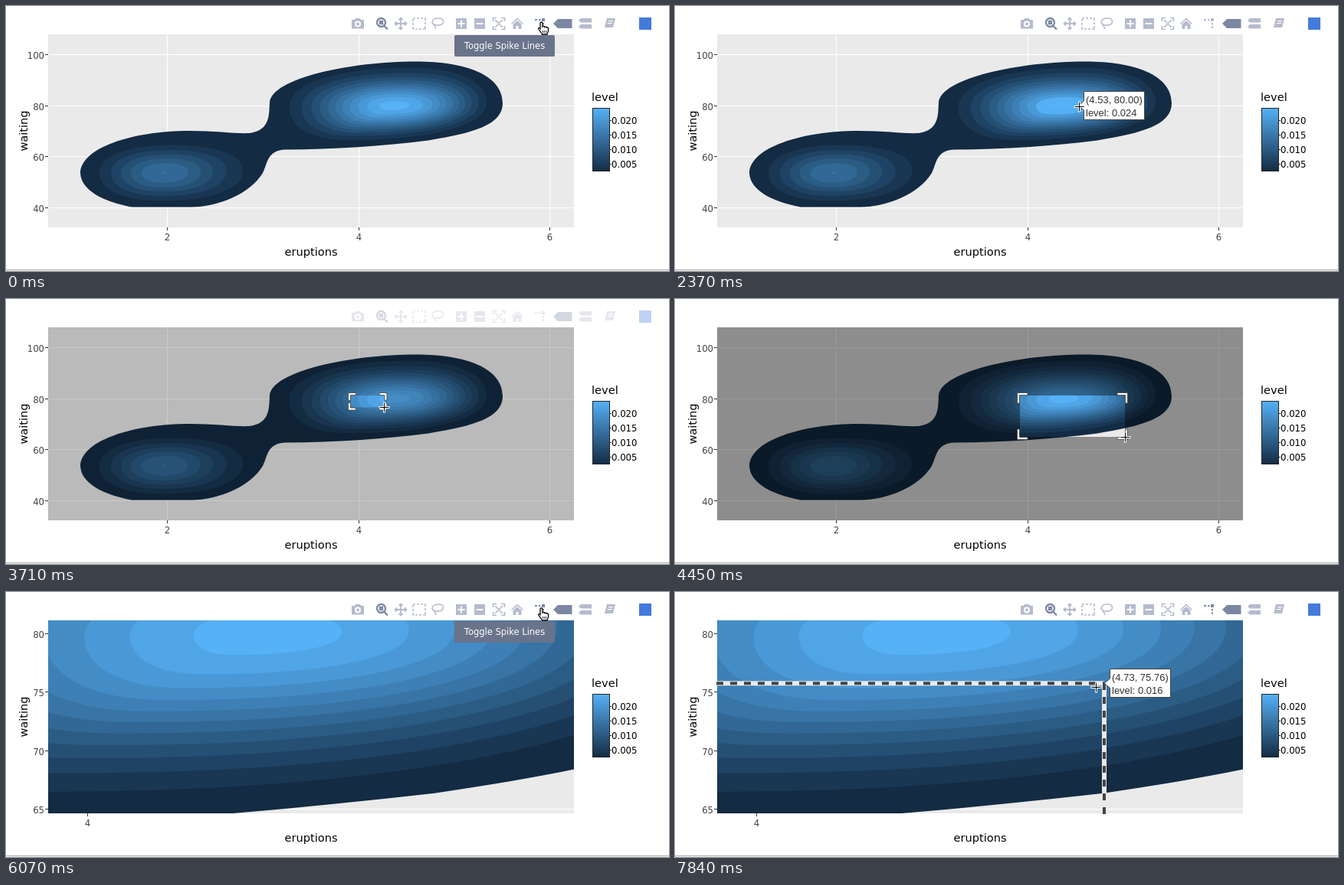
Recreate the animation shown at these times as an HTML page with a canvas. Size 865 px wide and 346 px high, loop 7.99 s.

```html
<!DOCTYPE html>
<html lang="en">
<head>
<meta charset="utf-8">
<title>Density contours</title>
<style>
  html, body { margin: 0; width: 100%; height: 100%; overflow: hidden; background: #fff; }
  canvas { display: block; }
</style>
</head>
<body>
<canvas id="stage" width="865" height="346"></canvas>
<script>
const ctx = document.getElementById('stage').getContext('2d');
const LOOP = 7990, STEP = 148.1, LAST_STEP = 53;
const PLOT = [55, 37, 686, 252];
const SANS = '"DejaVu Sans", sans-serif', LABEL = '"Liberation Sans", sans-serif';
const LIGHT = '#b5bbcd', DARK = '#7c87a2';
const ZOOM_STEP = 31, SPIKES_STEP = 45;
const BOX = { x: 450, y: 126 };

// Key points of the pointer: [step, x, y]
const CURSOR = [[0, 700, 29], [2, 672, 113], [4, 672, 113], [5, 652, 122], [12, 553, 134], [16, 527, 131],
  [20, 505, 128], [23, 450, 126], [24, 470, 132], [29, 587, 180], [34, 587, 180], [35, 499, 111],
  [41, 700, 29], [44, 700, 29], [47, 587, 82], [53, 549, 124]];
// Hovered spots: [step, x, y, level]
const HOVERS = [
  [[5, 649, 121, .002], [12, 554, 133, .02], [16, 526.4, 130, .024], [19, 515, 137, .024]],
  [[35, 501.5, 118.69, .018], [39, 638, 58, .014]],
  [[46, 625, 70, .014], [47, 594.2, 72.9, .018], [53, 560, 119.14, .016]]
];

const ramp = (k, from, to) => Math.max(0, Math.min(1, (k - from) / (to - from)));
const crisp = v => Math.floor(v) + .5;

function sample(track, k) {
  const i = track.findIndex(key => key[0] >= k);
  const b = track[i], a = track[i - 1] || b, f = ramp(k, a[0], b[0]) || 0;
  return a.slice(1).map((v, n) => v + (b[n + 1] - v) * f);
}

function levelColor(level) {
  const f = (level - 1) / 11, mix = (a, b) => Math.round(a + (b - a) * f);
  return `rgb(${mix(19, 86)},${mix(43, 177)},${mix(67, 247)})`;
}

// Superellipse whose extreme points lean away from a common centre
function oval([lx, ly], [tx, ty], [rx, ry], [bx, by]) {
  const path = new Path2D(), power = v => Math.sign(v) * Math.abs(v) ** (2 / 2.2);
  for (let i = 0; i < 120; i++) {
    const u = power(Math.cos(i * Math.PI / 60)), v = power(Math.sin(i * Math.PI / 60));
    const cx = v > 0 ? bx : tx, cy = u > 0 ? ry : ly;
    path.lineTo(cx + u * (u > 0 ? rx - cx : cx - lx), cy + v * (v > 0 ? by - cy : cy - ty));
  }
  path.closePath();
  return path;
}

// The lowest level joins both peaks; the others follow a Gaussian falloff
const contours = [[1, new Path2D(`M97 218C98 185 165 163 240 163C275 163 300 167 318 166C345 162 343 142 344 126
  C347 94 450 72.5 535 72.5C600 72.5 648 90 648 127C648 155 610 166 551 175.4C490 183 430 187 365 187.5
  C340 188 341 207 335 218C318 246 275 262.5 242 262.5L164 262.5C125 255 98 240 97 218Z`)]];
const radius = (peak, level) => Math.sqrt(Math.log(peak / level));
for (let level = 2; level <= 7; level++) {
  const r = radius(7.01, level);
  contours.push([level, oval([207 - 76 * r, 218], [207 + 9 * r, 218 - 32.5 * r],
    [207 + 70 * r + 19 * r * r, 218 - 3 * r], [207 - 4 * r, 218 + 32.5 * r])]);
}
for (let level = 2; level <= 12; level++) {
  const r = radius(12.4, level);
  contours.push([level, oval([506 - 101 * r, 130 + 2 * r], [506 + 16 * r, 130 - 31 * r - 4 * r * r],
    [506 + 118 * r - 21 * r * r, 130 - 3 * r], [506 - 45 * r, 130 + 33.3 * r])]);
}

// Data and base-plot pixels to screen pixels
const WHOLE = { sx: 1, sy: 1, x0: 55, y0: 37, xs: [2, 4, 6], ys: [40, 60, 80, 100] };
const ZOOMED = { sx: 4.97, sy: 4.59, x0: 449.6, y0: 126.2, xs: [4], ys: [65, 70, 75, 80] };
const toX = (v, u) => (460 + (u - 4) * 124.8 - v.x0) * v.sx + 55;
const toY = (v, u) => (130 - (u - 80) * 3.325 - v.y0) * v.sy + 37;
const fromX = (v, x) => 4 + ((x - 55) / v.sx + v.x0 - 460) / 124.8;
const fromY = (v, y) => 80 - ((y - 37) / v.sy + v.y0 - 130) / 3.325;

function text(str, x, y, size, color = '#000', align = 'left', family = SANS) {
  ctx.font = `${size}px ${family}`;
  ctx.fillStyle = color;
  ctx.textAlign = align;
  ctx.fillText(str, x, y);
}
function rect(x, y, w, h, color) {
  ctx.fillStyle = color;
  ctx.fillRect(x, y, w, h);
}
function line(x1, y1, x2, y2, color, width = 1, dash = []) {
  ctx.strokeStyle = color;
  ctx.lineWidth = width;
  ctx.setLineDash(dash);
  ctx.beginPath();
  ctx.moveTo(x1, y1);
  ctx.lineTo(x2, y2);
  ctx.stroke();
  ctx.setLineDash([]);
}
function shape(path, fill, stroke, width = 1) {
  ctx.fillStyle = fill;
  ctx.fill(path);
  ctx.strokeStyle = stroke;
  ctx.lineWidth = width;
  ctx.stroke(path);
}

function drawPlot(view, mergeTop) {
  rect(...PLOT, '#eaeaea');
  ctx.save();
  ctx.beginPath();
  ctx.rect(...PLOT);
  ctx.clip();
  for (const u of view.xs) line(crisp(toX(view, u)), 37, crisp(toX(view, u)), 289, '#fff');
  for (const u of view.ys) line(55, crisp(toY(view, u)), 741, crisp(toY(view, u)), '#fff');
  ctx.translate(55, 37);
  ctx.scale(view.sx, view.sy);
  ctx.translate(-view.x0, -view.y0);
  for (const [level, path] of contours) {
    ctx.fillStyle = levelColor(mergeTop && level === 11 ? 11.8 : level);
    ctx.fill(path);
  }
  ctx.restore();
}

function drawAxes(view) {
  for (const u of view.xs) {
    const x = crisp(toX(view, u));
    line(x, 289, x, 293, '#333');
    text(u, x, 305.5, 11.7, '#444', 'center');
  }
  for (const u of view.ys) {
    const y = crisp(toY(view, u));
    line(51, y, 55, y, '#333');
    text(u, 50, y + 5.7, 11.7, '#444', 'right');
  }
  text('eruptions', 398, 326, 14.6, '#000', 'center');
  ctx.save();
  ctx.translate(28, 163);
  ctx.rotate(-Math.PI / 2);
  text('waiting', 0, 0, 14.6, '#000', 'center');
  ctx.restore();
}

function drawLegend() {
  text('level', 764, 123.5, 14.6);
  const scale = ctx.createLinearGradient(0, 216, 0, 133);
  scale.addColorStop(0, levelColor(1));
  scale.addColorStop(1, levelColor(12));
  rect(765, 133, 23, 83, scale);
  ctx.strokeStyle = '#222';
  ctx.lineWidth = 1;
  ctx.strokeRect(765.5, 133.5, 22, 82);
  for (let i = 1; i <= 4; i++) {
    const y = 225.5 - i * 19;
    line(788, crisp(y), 790, crisp(y), '#333');
    text((i * .005).toFixed(3), 790, y + 4.7, 11.7);
  }
}

// [path, stroke width (0 = fill), dark]
const ICONS = [
  ['M451 18h4l1-2h6l1 2h4v11.5h-16zM463 23.5a4 4 0 1 0-8 0 4 4 0 0 0 8 0M461 23.5a2 2 0 1 0-4 0 2 2 0 0 0 4 0', 0],
  ['M495 21.5a5.5 5.5 0 1 0-11 0 5.5 5.5 0 0 0 11 0M493 25.5l5 5M488 20h3v3h-3z', 2.3, true],
  ['M508 23h14M515 16v14M512.5 18l2.5-2.5 2.5 2.5M512.5 28l2.5 2.5 2.5-2.5M510 20.5l-2.5 2.5 2.5 2.5M520 20.5l2.5 2.5-2.5 2.5', 1.8],
  ['M531 16h3m2 0h3m2 0h3m2 0h1v3m0 2v3m0 2v4h-3m-2 0h-3m-2 0h-3m-2 0h-1v-3m0-2v-3m0-2v-3', 1.6],
  ['M560 25c-7-2-4-9 4-9 9 0 8 8 1 9-4 .5-7-1-6 1s3 2 1 4', 1.6],
  ['M587 16h14v14h-14zM593 18.5v3.5h-3.5v2h3.5v3.5h2v-3.5h3.5v-2h-3.5v-3.5z', 0],
  ['M611 16h14v14h-14zM613.5 22v2h9v-2z', 0],
  ['M635.5 20v-4.5h4.5M646 15.5h4.5v4.5M650.5 26v4.5h-4.5M640 30.5h-4.5v-4.5M638 18l10 10M648 18l-10 10', 1.7],
  ['M667 15.5l8 7.5-1 1-7-6.5-7 6.5-1-1zM667 19l5.5 5v6h-4v-4h-3v4h-4v-6z', 0],
  ['M690 17h3v2h-3zM695 17h2.5v2h-2.5zM699 16h4v4h-4zM700 22h2v2.5h-2zM700 26.5h2v2.5h-2z', 0],
  ['M714 23l6-6h18.5v12h-18.5z', 0, true],
  ['M747 19l3-3h14v5.5h-14zM747 27l3-3h14v5.5h-14z', 0],
  ['M784 16h11l-3 12h-11zM786 19h6l-.4 1.2h-6zM785 22h6l-.4 1.2h-6z', 0]
].map(([d, width, dark]) => ({ path: new Path2D(d), width, dark }));
const SPIKE_ICON = 9;

function drawModebar(alpha, spikeDark) {
  ctx.save();
  ctx.globalAlpha = alpha;
  ICONS.forEach(({ path, width, dark }, i) => {
    ctx.fillStyle = ctx.strokeStyle = dark || (i === SPIKE_ICON && spikeDark) ? DARK : LIGHT;
    ctx.lineWidth = width;
    if (width) ctx.stroke(path);
    else ctx.fill(path, 'evenodd');
  });
  rect(826, 15, 16, 16, '#447adb');
  ctx.restore();
}

function drawTooltip() {
  ctx.fillStyle = '#69738a';
  ctx.beginPath();
  ctx.roundRect(585, 38, 131, 28, 2);
  ctx.fill();
  text('Toggle Spike Lines', 650.5, 56, 11.5, '#fff', 'center');
}

function drawSpikes(x, y) {
  const lines = [[x, 290, x, y], [54, y, x, y]];
  for (const l of lines) line(...l, '#eaeaea', 6);
  for (const l of lines) line(...l, '#444', 4, [9, 9]);
}

function drawHover(view, [x, y, level]) {
  const left = Math.round(x + 6.5) + .5, top = Math.round(y - 19) + .5;
  shape(new Path2D(`M${x} ${y}L${left} ${y - 6}V${top}h79v37h-79V${y + 6}Z`), '#fff', '#444');
  const snapped = Math.round(level * 500) / 500;
  const rows = [`(${fromX(view, x).toFixed(2)}, ${fromY(view, y).toFixed(2)})`, `level: ${snapped.toFixed(3)}`];
  rows.forEach((row, i) => text(row, left + 2.5, top + 15.5 + i * 16.5, 13, '#333', 'left', LABEL));
}

function drawZoomBox(cx, cy, alpha) {
  const open = alpha > .1;
  ctx.fillStyle = `rgba(0,0,0,${alpha})`;
  ctx.beginPath();
  ctx.rect(...PLOT);
  if (open) ctx.rect(BOX.x, BOX.y, cx - BOX.x, cy - BOX.y);
  ctx.fill('evenodd');
  if (!open) return;
  const len = Math.min(10, (cy - BOX.y) / 2.5);
  const corner = new Path2D(`M-3.5-3.5H${len}V-.5H-.5V${len}H-3.5Z`);
  for (const [x, sx] of [[BOX.x, 1], [cx, -1]]) {
    for (const [y, sy] of [[BOX.y, 1], [cy, -1]]) {
      ctx.save();
      ctx.translate(x, y);
      ctx.scale(sx, sy);
      shape(corner, '#fff', '#444', .8);
      ctx.restore();
    }
  }
}

const HAND = new Path2D('M-3-6.5c0-2 3-2 3 0v4.5c1-1 2.5-.5 2.7.5 1-.8 2.3-.3 2.5.7 1.2-.6 2.3 0 2.3 1.3v3c0 2-1.500 2.500-1.500 4.500h-6.500c-.5-2-3-4-4.500-6.500-1-2 1-2.500 2-1z');

function drawHand(x, y) {
  ctx.save();
  ctx.translate(x, y);
  shape(HAND, '#fff', '#000', 1.3);
  for (let i = 0; i < 3; i++) line(.5 + i * 2.1, 3, .5 + i * 2.1, 6, '#000', .8);
  ctx.restore();
}

function drawCross(x, y) {
  x = crisp(x);
  y = crisp(y);
  for (const [color, width, arm] of [['#fff', 3, 7], ['#000', 1, 6]]) {
    line(x - arm, y, x + arm, y, color, width);
    line(x, y - arm, x, y + arm, color, width);
  }
}

function draw(t) {
  const k = Math.min(LAST_STEP, Math.floor((t + 10) / STEP));
  const view = k < ZOOM_STEP ? WHOLE : ZOOMED;
  const spikesOn = k >= SPIKES_STEP;
  const onButton = k === 0 || (k >= 41 && !spikesOn);
  const hoverTrack = HOVERS.find(h => k >= h[0][0] && k <= h.at(-1)[0]);
  const [cx, cy] = sample(CURSOR, k);

  rect(0, 0, 865, 346, '#fff');
  line(0, 344.5, 865, 344.5, '#b9b9b9', 1.5);
  drawPlot(view, k >= 1 && k < 22);
  drawAxes(view);
  drawLegend();
  if (view === WHOLE && k > 23) drawZoomBox(cx, cy, .4 * ramp(k, 23.9, 26));
  drawModebar(view === WHOLE ? 1 - ramp(k, 23, 26) : ramp(k, ZOOM_STEP, 33), onButton || spikesOn);
  if (onButton) drawTooltip();
  if (hoverTrack) {
    const spot = sample(hoverTrack, k);
    if (spikesOn) drawSpikes(spot[0], spot[1]);
    drawHover(view, spot);
  }
  if (onButton) drawHand(cx, cy);
  else drawCross(cx, cy);
}

const start = performance.now();
function tick() {
  draw((performance.now() - start) % LOOP);
  requestAnimationFrame(tick);
}
tick();
</script>
</body>
</html>
```
